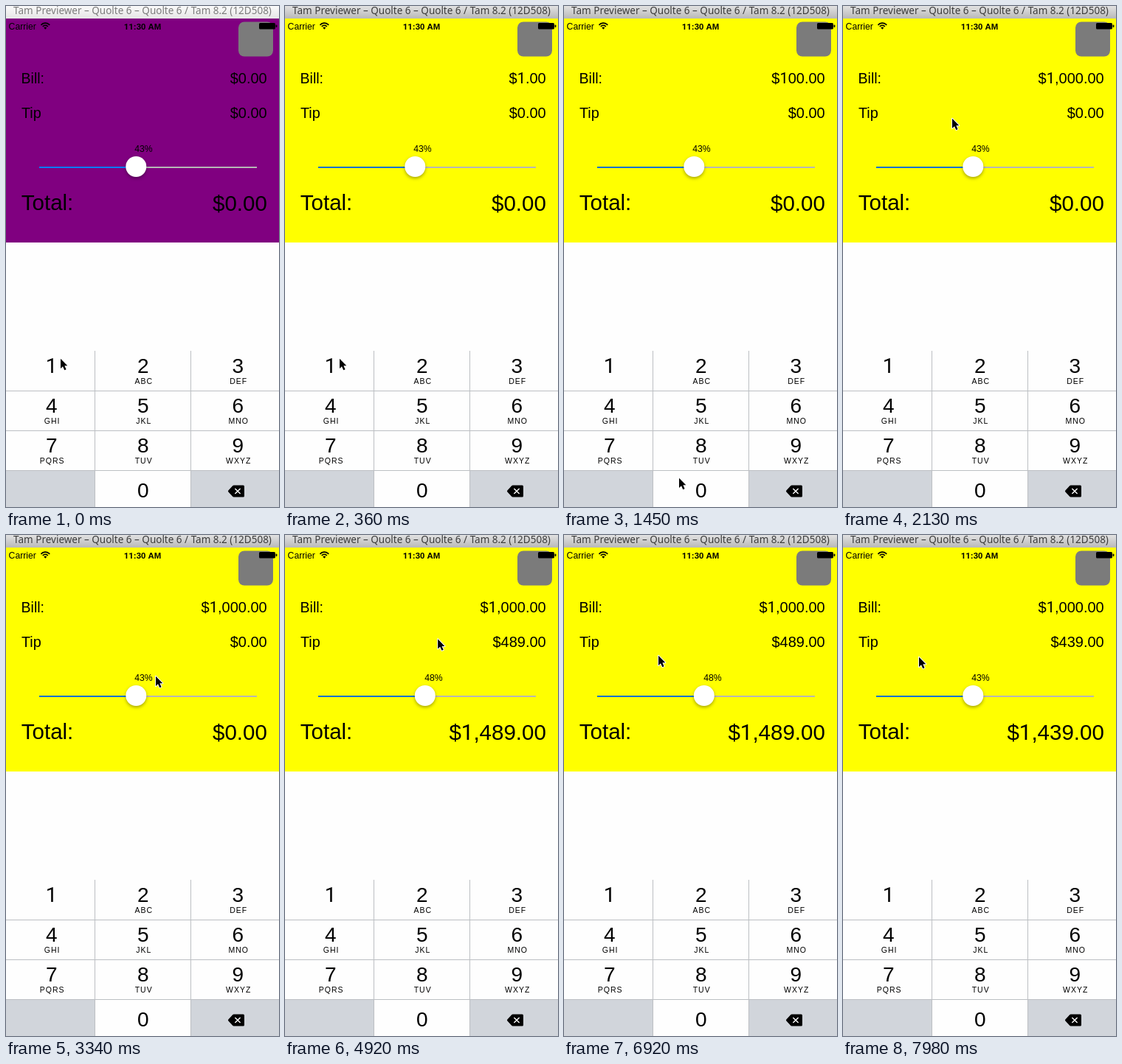
Write an HTML page with a canvas that moves like this. It is 370 by 680 pixels and loops after 8 s.

```html
<!DOCTYPE html>
<html lang="en">
<head>
<meta charset="utf-8">
<title>Tip calculator</title>
<style>
html, body { margin: 0; width: 100%; height: 100%; overflow: hidden; background: #fefefe; }
canvas { display: block; width: 370px; height: 680px; }
</style>
</head>
<body>
<canvas id="stage"></canvas>
<script>
const W = 370, H = 680, LOOP = 8000;
const canvas = document.getElementById('stage');
const ctx = canvas.getContext('2d');
const dpr = window.devicePixelRatio || 1;
canvas.width = W * dpr;
canvas.height = H * dpr;

const SANS = '"Liberation Sans", Arial, sans-serif';
const ONE = 'Roboto, Arial, sans-serif'; // its "1" has no foot
const LETTERS = ['', 'ABC', 'DEF', 'GHI', 'JKL', 'MNO', 'PQRS', 'TUV', 'WXYZ'];
const PAPER = '#fefefe', GRAY = '#d1d5db', RULE = '#bcbfc3';
const ROW = 54, PAD_TOP = 468, MID = 185.7, STEP = 5;
const TIP_SHOWN = 3690;

// Each tap types its digit on release.
const TAPS = [
  { key: '1', down: 90, up: 270 },
  { key: '0', down: 910, up: 1180 },
  { key: '0', down: 1270, up: 1450 },
  { key: '0', down: 1630, up: 1720 }
];

// Pointer moves; a swipe changes the rate one step when it ends.
const HOME = { x: 74, y: 478 };
const MOVES = [
  { from: 360, to: 850, x: 156, y: 640 },
  { from: 1710, to: 2130, x: 148, y: 152 },
  { from: 2130, to: 2900, x: 226, y: 268 },
  { from: 2900, to: 3340, x: 203, y: 191 },
  { from: 3780, to: 4190, x: 130, y: 160 },
  { from: 4340, to: 4540, x: 210, y: 140, swipe: 1 },
  { from: 4900, to: 5100, x: 118, y: 160 },
  { from: 5340, to: 5540, x: 277, y: 155, swipe: 1 },
  { from: 6110, to: 6920, x: 128, y: 163, swipe: -1 },
  { from: 7150, to: 7340, x: 190, y: 162 },
  { from: 7340, to: 7620, x: 43, y: 166, swipe: -1 },
  { from: 7800, to: 7980, x: 103, y: 165 }
];

const held = (key, t) => TAPS.some(p => p.key === key && t >= p.down && t < p.up);
const billAt = t => Number(TAPS.filter(p => t >= p.up).map(p => p.key).join(''));
const rateAt = t => MOVES.reduce((r, m) => r + (t >= m.to && m.swipe ? m.swipe * STEP : 0), 43);
const money = n => '$' + n.toLocaleString('en-US', { minimumFractionDigits: 2 });

function pointer(t) {
  let { x, y } = HOME;
  for (const m of MOVES) {
    const k = Math.min(1, Math.max(0, (t - m.from) / (m.to - m.from)));
    const e = k * k * (3 - 2 * k);
    x += (m.x - x) * e;
    y += (m.y - y) * e;
  }
  return [x, y];
}

function rect(x, y, w, h, color) {
  ctx.fillStyle = color;
  ctx.fillRect(x, y, w, h);
}

function rounded(x, y, w, h, r, color) {
  ctx.fillStyle = color;
  ctx.beginPath();
  ctx.roundRect(x, y, w, h, r);
  ctx.fill();
}

// align: 0 left, 0.5 centre, 1 right
function text(str, x, y, size, align = 0, weight = '') {
  ctx.fillStyle = '#000';
  const runs = str.split(/(1)/).filter(Boolean).map(s => {
    const font = `${weight} ${size}px ${s === '1' ? ONE : SANS}`;
    ctx.font = font;
    return { s, font, w: ctx.measureText(s).width };
  });
  x -= align * runs.reduce((sum, r) => sum + r.w, 0);
  for (const r of runs) {
    ctx.font = r.font;
    ctx.fillText(r.s, x, y);
    x += r.w;
  }
}

function polygon(points) {
  ctx.beginPath();
  points.forEach(p => ctx.lineTo(p[0], p[1]));
  ctx.closePath();
}

function titleBar(active) {
  const g = ctx.createLinearGradient(0, 0, 0, 17);
  g.addColorStop(0, active ? '#e2e2e2' : '#fafafa');
  g.addColorStop(1, active ? '#b8b8b8' : '#e6e6e6');
  rect(0, 0, W, 17, g);
  ctx.fillStyle = active ? '#3c3c3c' : '#7c7c7c';
  ctx.font = '13.5px "Noto Sans", "Open Sans", sans-serif';
  ctx.textAlign = 'center';
  ctx.fillText('Tam Previewer – Quolte 6 – Quolte 6 / Tam 8.2 (12D508)', 185, 10.5);
  ctx.textAlign = 'left';
}

function statusBar() {
  text('Carrier', 3.6, 32, 12.2);
  text('11:30 AM', 185, 32, 11.4, 0.5, 'bold');
  ctx.strokeStyle = '#000';
  ctx.lineWidth = 1.7;
  for (const r of [4.6, 7.8]) {
    ctx.beginPath();
    ctx.arc(53.3, 31, r, -Math.PI * 0.77, -Math.PI * 0.23);
    ctx.stroke();
  }
  ctx.fillStyle = '#000';
  ctx.beginPath();
  ctx.moveTo(53.3, 31.8);
  ctx.arc(53.3, 31, 2.4, -Math.PI * 0.8, -Math.PI * 0.2);
  ctx.fill();
  rounded(315, 21.5, 47, 47, 8, '#7b7b7b');
  rounded(343, 23, 22, 8.5, 1.5, '#000');
  rounded(365.6, 25.5, 1.8, 3.5, 1, '#000');
}

function slider(rate, lively) {
  const x = 176.3 + (rate - 43) * 2.7;
  rect(45, 218, 295, 2, '#b6b6b6');
  rect(45, 218, x - 45, 2, lively ? '#0872d0' : '#007aff');
  ctx.save();
  ctx.shadowColor = 'rgba(0,0,0,.35)';
  ctx.shadowBlur = 4 * dpr;
  ctx.shadowOffsetY = 2 * dpr;
  ctx.fillStyle = '#fff';
  ctx.beginPath();
  ctx.arc(x, 218, 14, 0, Math.PI * 2);
  ctx.fill();
  ctx.restore();
  text(rate + '%', 174.2 + (rate - 43) * 3, 198, 12.2);
}

function form(t) {
  const bill = billAt(t), rate = rateAt(t);
  const tip = t < TIP_SHOWN ? 0 : rate * 10 + 9;
  const lively = bill > 0;
  rect(0, 17, W, 304, lively ? '#ffff00' : '#800080');
  statusBar();
  text('Bill:', 20.6, 105, 19.5);
  text(money(bill), 353.7, 105, 20, 1);
  text('Tip', 21, 152, 19.8);
  text(money(tip), 353.7, 152, 20, 1);
  slider(rate, lively);
  text('Total:', 20.8, 277, 29.5);
  text(money(tip && bill + tip), 353.8, 278.3, 29.5, 1);
}

function backspace() {
  ctx.fillStyle = ctx.strokeStyle = '#000';
  ctx.lineJoin = 'round';
  ctx.lineWidth = 3;
  polygon([[302.5, 658.5], [308.5, 652], [321.5, 652], [321.5, 665], [308.5, 665]]);
  ctx.fill();
  ctx.stroke();
  ctx.strokeStyle = '#fff';
  ctx.lineWidth = 1.4;
  ctx.beginPath();
  for (const s of [-1, 1]) {
    ctx.moveTo(314 - 3.6, 658.5 - 3.6 * s);
    ctx.lineTo(314 + 3.6, 658.5 + 3.6 * s);
  }
  ctx.stroke();
}

function keypad(t) {
  const bottom = PAD_TOP + 3 * ROW;
  if (held('1', t)) rect(0, PAD_TOP, 120, ROW, GRAY);
  rect(0, bottom, W, H - bottom, GRAY);
  if (!held('0', t)) rect(121, bottom, 129, H - bottom, PAPER);
  for (let i = 1; i <= 3; i++) rect(0, PAD_TOP + i * ROW, W, 1, RULE);
  for (const x of [120, 250]) rect(x, PAD_TOP, 1, H - PAD_TOP, RULE);
  LETTERS.forEach((word, i) => {
    const x = MID + (i % 3 - 1) * 128.5 + (i % 3 ? 0 : 4.5);
    const y = PAD_TOP + 29.5 + Math.floor(i / 3) * ROW;
    text(String(i + 1), x, y, 28, 0.5);
    ctx.letterSpacing = '1px';
    text(word, x + 1, y + 15.5, 10.5, 0.5);
    ctx.letterSpacing = '0px';
  });
  text('0', MID, 667, 28, 0.5);
  backspace();
}

function arrow(x, y) {
  ctx.save();
  ctx.translate(x, y + 0.7);
  polygon([[0, 0], [0, 13.2], [3, 10.5], [5.3, 15.5], [7.6, 14.5], [5.4, 9.6], [9.3, 9.6]]);
  ctx.lineJoin = 'round';
  ctx.lineWidth = 2;
  ctx.strokeStyle = '#fff';
  ctx.stroke();
  ctx.fillStyle = '#000';
  ctx.fill();
  ctx.restore();
}

const start = performance.now();
function draw(now) {
  const t = Math.max(0, now - start) % LOOP;
  ctx.setTransform(dpr, 0, 0, dpr, 0, 0);
  rect(0, 0, W, H, PAPER);
  titleBar(t >= TAPS[0].down);
  form(t);
  keypad(t);
  arrow(...pointer(t));
  requestAnimationFrame(draw);
}
draw(start);
</script>
</body>
</html>
```
